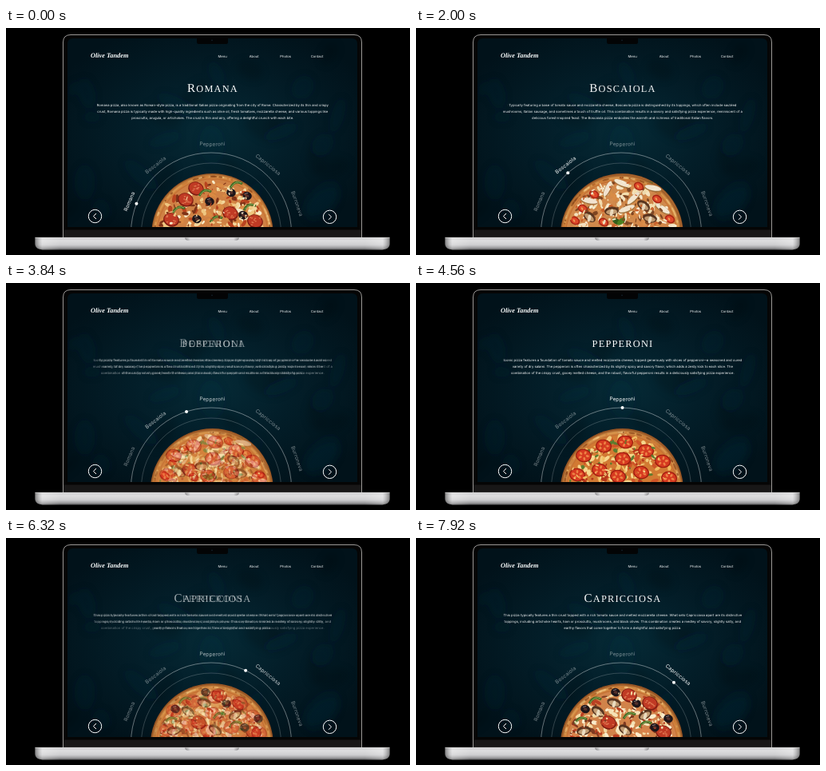
Write an HTML page that moves like this. It is 506 px wide and 284 px high and loops after 8000 ms.

```html
<!DOCTYPE html>
<html lang="en">
<head>
<meta charset="utf-8">
<title>Pizza menu</title>
<style>
  html, body { margin: 0; width: 100%; height: 100%; overflow: hidden; background: #000; }
  svg { display: block; width: 100vw; height: 100vh; }
  text { fill: #fff; text-rendering: geometricPrecision; }
  .copy { font: 4.22px Inter, sans-serif; }
  .middle { text-anchor: middle; }
  .title { font: 12.3px "Liberation Serif", serif; letter-spacing: 1.25px; }
  .cap { font-size: 15px; }
  .label { font: 6.5px Inter, sans-serif; letter-spacing: .15px; }
  .brand { font: italic bold 8.3px "Liberation Serif", serif; }
  .line { fill: none; stroke: #fff; }
</style>
</head>
<body>
<svg viewBox="0 0 506 284">
  <defs>
    <radialGradient id="night" cx=".5" cy=".5" r=".6">
      <stop offset="0" stop-color="#052a36"/>
      <stop offset=".45" stop-color="#031e29"/>
      <stop offset="1" stop-color="#01121a"/>
    </radialGradient>
    <linearGradient id="metal" x2="0" y2="1">
      <stop offset="0" stop-color="#c9c9cc"/>
      <stop offset=".25" stop-color="#dededf"/>
      <stop offset=".6" stop-color="#cfcfd1"/>
      <stop offset=".82" stop-color="#a3a3a5"/>
      <stop offset="1" stop-color="#5c5c5e"/>
    </linearGradient>
    <linearGradient id="sides">
      <stop offset="0" stop-color="#000" stop-opacity=".4"/>
      <stop offset=".02" stop-color="#fff" stop-opacity=".25"/>
      <stop offset=".07" stop-color="#fff" stop-opacity="0"/>
      <stop offset=".93" stop-color="#fff" stop-opacity="0"/>
      <stop offset=".98" stop-color="#fff" stop-opacity=".25"/>
      <stop offset="1" stop-color="#000" stop-opacity=".4"/>
    </linearGradient>
    <linearGradient id="groove">
      <stop offset="0" stop-color="#858587"/>
      <stop offset=".1" stop-color="#d8d8da"/>
      <stop offset=".9" stop-color="#d8d8da"/>
      <stop offset="1" stop-color="#858587"/>
    </linearGradient>
    <radialGradient id="crust">
      <stop offset=".88" stop-color="#b4531f"/>
      <stop offset=".95" stop-color="#dc9a4f"/>
      <stop offset="1" stop-color="#8f4d1f"/>
    </radialGradient>
    <filter id="soft" x="-50%" y="-50%" width="200%" height="200%"><feGaussianBlur stdDeviation="5"/></filter>
    <clipPath id="screen"><path d="M77 249V20q0-7 7-7H433q7 0 7 7V249z"/></clipPath>
    <path id="smile" d="M236 146Q258.500 149.500 281 146"/>
    <path id="base" d="M36.500 262H480.500V270q0 7.500-12 7.500H48.500q-12 0-12-7.500z"/>
  </defs>

  <path d="M71.500 262V18q0-9.500 9.500-9.500H436q9.500 0 9.500 9.500V262z" fill="#050505" stroke="#9a9896"/>
  <g clip-path="url(#screen)">
    <rect x="77" y="13" width="363" height="236" fill="url(#night)"/>
    <g id="smudges" filter="url(#soft)"></g>
    <text class="brand" x="106" y="37">Olive Tandem</text>
    <g class="copy">
      <text x="265.500" y="37">Menu</text>
      <text x="304.700" y="37">About</text>
      <text x="343.300" y="37">Photos</text>
      <text x="381.700" y="37">Contact</text>
    </g>
    <g id="texts"></g>
    <g class="line">
      <circle cx="257" cy="256.500" r="100.500" stroke-width=".5" opacity=".8"/>
      <circle cx="257" cy="256.500" r="87.500" stroke-width=".45" opacity=".45"/>
    </g>
    <g id="labels"></g>
    <g id="pizzas"></g>
    <circle id="dot" r="2" fill="#fff"/>
    <g class="line" stroke-width="1">
      <circle cx="111.500" cy="235.500" r="8.200"/>
      <path d="M113 232l-3.500 3.500 3.500 3.500"/>
      <circle cx="405.500" cy="236.300" r="8.200"/>
      <path d="M404 232.800l3.500 3.500-3.500 3.500"/>
    </g>
  </g>
  <path d="M239 13h39v4.500q0 2.500-2.500 2.500h-34q-2.500 0-2.500-2.500z" fill="#030405"/>
  <circle cx="258" cy="15.300" r=".9" fill="#15212b"/>
  <rect x="72" y="252.500" width="373" height="9.500" fill="#181717"/>
  <use href="#base" fill="url(#metal)"/>
  <use href="#base" fill="url(#sides)"/>
  <path d="M224 262h68q0 4-5 4h-58q-5 0-5-4z" fill="url(#groove)"/>
  <path d="M36.500 262.300H480.500" stroke="#efeeed" stroke-width=".6"/>
</svg>
<script>
const byId = id => document.getElementById(id);
const CENTER = { x: 257, y: 256.5, r: 100.5 };
const PIZZA_RADIUS = 76.3;
const FIRST_MOVE = 593, HOLD = 800, MOVE = 1600, LOOP = 8000;
const STOPS = [158.6, 130.5, 89.1, 49.5, 21.4];

let seed = 7;
function random() {
  seed = (seed * 16807) % 2147483647;
  return seed / 2147483647;
}
const between = (a, b) => a + (b - a) * random();
const pick = list => list[Math.floor(random() * list.length)];
const repeat = (n, make) => Array.from({ length: n }, make).join('');
const ellipse = (x, y, rx, ry, turn, fill, extra = '') =>
  `<ellipse rx="${rx}" ry="${ry}" fill="${fill}" transform="translate(${x} ${y}) rotate(${turn})" ${extra}/>`;

const toppings = {
  salami: (x, y) => ellipse(x, y, 10, 8.5, 20, '#7d1c12') + ellipse(x, y - .5, 8.8, 7.3, 20, '#c03a24') +
    repeat(9, () => ellipse(x + between(-6, 6), y + between(-5, 5), 1.3, .8, 0, '#df7650')),
  olive: (x, y) => ellipse(x, y, 4.2, 3.4, 15, '#54302a', 'stroke="#1d1519" stroke-width="3.4"') +
    ellipse(x - 1, y - 3, 2.4, .6, -15, '#877579'),
  pepper: (x, y) => `<path d="M${x - 8} ${y + 4}q6-11 15-5" fill="none" stroke="#3f6a24" stroke-width="3"/>` +
    `<path d="M${x - 7} ${y + 3}q6-9 13-5" fill="none" stroke="#a3b861" stroke-width=".8"/>`,
  tomato: (x, y) => ellipse(x, y, 6.5, 5, 30, '#a82011') + ellipse(x, y, 5, 3.6, 30, '#e0482a') +
    ellipse(x - 1, y, 2, 1, 60, '#f3a45a'),
  slice: (x, y) => ellipse(x, y, 10, 8.3, 10, '#9c1a0e') + ellipse(x, y, 8.8, 7.1, 10, '#d63a20') +
    repeat(5, (_, i) => {
      const a = i * 1.257 + x;
      return ellipse(x + 4.8 * Math.cos(a), y + 3.9 * Math.sin(a), 2.1, 1.4, a * 57.3, '#ee8244');
    }),
  mushroom: (x, y) => ellipse(x, y, 9, 5.5, x * 7 % 80 - 40, '#55331f') +
    ellipse(x, y + 1, 7, 3.2, x * 7 % 80 - 40, '#bf9b73') + ellipse(x, y + 2, 2, 4.5, 15, '#eadcc0'),
  chicken: (x, y) => ellipse(x, y + .8, 11, 4, x * 11 % 110 - 65, '#a0713c') +
    ellipse(x, y, 10.5, 3.2, x * 11 % 110 - 65, '#f4ead6'),
  basil: (x, y) => ellipse(x - 3, y, 6, 3.3, 35, '#2c5c1a') + ellipse(x + 3, y, 6, 3.3, -40, '#47801f')
};

const pizzas = [
  {
    name: 'Romana', label: [154.5, 217, -67], x: 258.5, top: 182, cheese: '#cf8144',
    specks: ['#f8ebc8', '#f3d69b', '#efc680', '#b8431f', '#d98a43', '#7f3317'],
    lines: ['Romana pizza, also known as Roman-style pizza, is a traditional Italian pizza originating from the city of Rome. Characterized by its thin and crispy',
      'crust, Romana pizza is typically made with high-quality ingredients such as olive oil, fresh tomatoes, mozzarella cheese, and various toppings like',
      'prosciutto, arugula, or artichokes. The crust is thin and airy, offering a delightful crunch with each bite.'],
    parts: { salami: [238, 201, 207, 240, 281, 232, 312, 242, 225, 215], pepper: [217, 227, 250, 206, 289, 196, 264, 239, 306, 224],
      olive: [255, 217, 282, 206, 302, 210, 297, 234, 239, 239] }
  },
  {
    name: 'Boscaiola', label: [187.3, 171.5, -38], x: 257, top: 183.5, cheese: '#d28a4c',
    specks: ['#fbf1d6', '#f5e2b4', '#f6e7c4', '#c9622c', '#d98d48', '#7d4522'],
    lines: ['Typically featuring a base of tomato sauce and mozzarella cheese, Boscaiola pizza is distinguished by its toppings, which often include sautéed',
      'mushrooms, Italian sausage, and sometimes a touch of truffle oil. This combination results in a savory and satisfying pizza experience, reminiscent of a',
      'delicious forest-inspired feast. The Boscaiola pizza embodies the warmth and richness of traditional Italian flavors.'],
    parts: { chicken: [240, 201, 272, 213, 297, 200, 258, 194, 217, 216, 264, 226, 309, 226], mushroom: [245, 229, 293, 238, 217, 236, 285, 222],
      tomato: [223, 208, 209, 226, 279, 198, 302, 214, 318, 239, 235, 243, 199, 241], basil: [254, 242] }
  },
  {
    name: 'pepperoni', x: 258, top: 183, cheese: '#d27a33',
    specks: ['#f6d78c', '#f0bd62', '#cf5427', '#b5361a', '#f2c878', '#5c7c2f'],
    lines: ['Iconic pizza features a foundation of tomato sauce and melted mozzarella cheese, topped generously with slices of pepperoni—a seasoned and cured',
      'variety of dry salami. The pepperoni is often characterized by its slightly spicy and savory flavor, which adds a zesty kick to each slice. The',
      'combination of the crispy crust, gooey melted cheese, and the robust, flavorful pepperoni results in a deliciously satisfying pizza experience.'],
    parts: { slice: [210, 216, 202, 240, 235, 204, 230, 234, 262, 199, 259, 220, 288, 210, 282, 237, 309, 223, 317, 244, 253, 242] }
  },
  {
    name: 'Capricciosa', label: [328.2, 171, 39], x: 258, top: 183, cheese: '#d0834a',
    specks: ['#faeccb', '#f3d8a0', '#f5e2b6', '#bb4022', '#d9824a', '#7f3a20'],
    lines: ['This pizza typically features a thin crust topped with a rich tomato sauce and melted mozzarella cheese. What sets Capricciosa apart are its distinctive',
      'toppings, including artichoke hearts, ham or prosciutto, mushrooms, and black olives. This combination creates a medley of savory, slightly salty, and',
      'earthy flavors that come together to form a delightful and satisfying pizza.'],
    parts: { salami: [267, 197, 293, 207, 241, 231, 310, 243], pepper: [225, 203, 288, 233, 268, 222, 207, 228],
      mushroom: [228, 217, 248, 206, 287, 221, 210, 241, 262, 240], olive: [250, 193, 276, 207, 299, 237, 316, 226, 212, 214] }
  }
];

function drawPizza({ x, top, cheese, specks, parts }) {
  const cy = top + PIZZA_RADIUS;
  const speck = size => {
    const a = between(Math.PI, 2 * Math.PI), d = 67 * Math.sqrt(random());
    return ellipse(x + d * Math.cos(a), cy + d * Math.sin(a), size * between(1, 4), size * between(.7, 2), between(0, 180), pick(specks));
  };
  const blister = () => {
    const a = between(Math.PI, 2 * Math.PI);
    return ellipse(x + 72.5 * Math.cos(a), cy + 72.5 * Math.sin(a), between(1, 5), 1.2, a * 57.3 + 90, pick(['#f0c27c', '#8a4519', '#c9742f']), 'opacity=".7"');
  };
  const placed = Object.entries(parts).map(([kind, at]) =>
    at.map((v, i) => i % 2 ? toppings[kind](at[i - 1], v) : '').join('')).join('');
  return `<g><circle cx="${x}" cy="${cy}" r="${PIZZA_RADIUS}" fill="url(#crust)"/>${repeat(50, blister)}` +
    `<circle cx="${x}" cy="${cy}" r="69" fill="${cheese}"/>${repeat(230, () => speck(1.4))}${placed}${repeat(60, () => speck(.8))}</g>`;
}

function drawText({ name, lines }) {
  const title = name.replace(/^[A-Z]/, '<tspan class="cap">$&</tspan>')
    .replace(/[a-z]+$/, s => s.toUpperCase());
  return `<g class="middle"><text class="title" x="259" y="80.200">${title}</text>` +
    lines.map((s, i) => `<text class="copy" x="258.800" y="${97.5 + i * 8.2}">${s}</text>`).join('') + '</g>';
}

function drawLabel({ name, label }) {
  if (!label) return '<text class="label middle"><textPath href="#smile" startOffset="50%">Pepperoni</textPath></text>';
  const [x, y, turn] = label;
  return `<text class="label middle" dy="2.200" transform="translate(${x} ${y}) rotate(${turn})">${name}</text>`;
}

byId('smudges').innerHTML = repeat(30, () => ellipse(between(80, 437), between(20, 245), between(8, 28), between(5, 16),
  between(0, 180), pick(['#0a3a48', '#000b10']), 'opacity=".14"'));
byId('pizzas').innerHTML = pizzas.map(drawPizza).join('');
byId('texts').innerHTML = pizzas.map(drawText).join('');
byId('labels').innerHTML = [...pizzas, { name: 'Burroneva', label: [364.5, 219.8, 71] }].map(drawLabel).join('');

const clamp = v => Math.min(1, Math.max(0, v));
const ease = v => v * v * (3 - 2 * v);

function render(time) {
  let position = 0;
  for (let i = 0; i < 4; i++) position += ease(clamp((time - FIRST_MOVE - i * (HOLD + MOVE)) / MOVE));

  const active = i => clamp(1 - Math.abs(position - i));
  [...byId('texts').children].forEach((el, i) => el.setAttribute('opacity', active(i)));
  [...byId('labels').children].forEach((el, i) => el.setAttribute('opacity', .48 + .52 * active(i)));
  // Each pizza fades in over the one below it.
  [...byId('pizzas').children].forEach((el, i) => el.setAttribute('opacity', clamp(position - i + 1)));

  const from = Math.floor(position);
  const angle = STOPS[from] + (STOPS[from + 1] - STOPS[from]) * (position - from);
  const rad = angle * Math.PI / 180;
  byId('dot').setAttribute('cx', CENTER.x + CENTER.r * Math.cos(rad));
  byId('dot').setAttribute('cy', CENTER.y - CENTER.r * Math.sin(rad));
}

const start = performance.now();
function tick() {
  render((performance.now() - start) % LOOP);
  requestAnimationFrame(tick);
}
tick();
</script>
</body>
</html>
```
